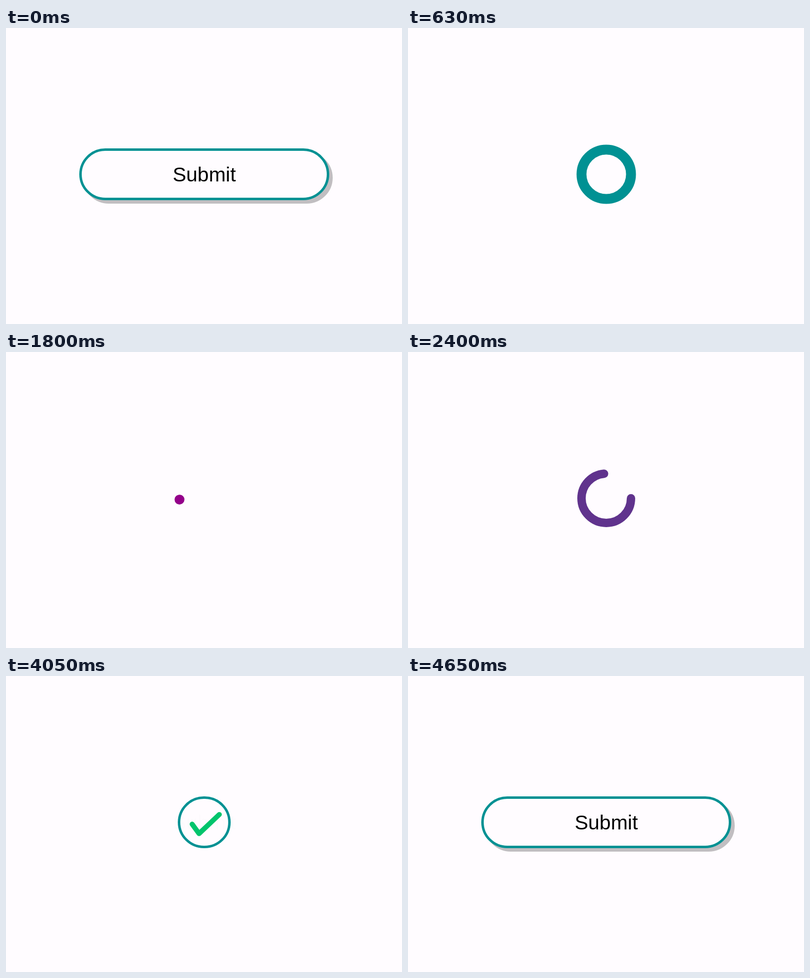
Animation of 800x600 px, one loop 6.3 s. Source, as an HTML page:

```html
<!DOCTYPE html>
<html lang="en">
<head>
<meta charset="utf-8">
<title>Submit button</title>
<style>
  html, body { margin: 0; width: 100%; height: 100%; overflow: hidden; background: #fffcff; }
  svg { display: block; width: 100%; height: 100%; }
  text { font: 41px "Liberation Sans", Arial, sans-serif; text-anchor: middle; }
</style>
</head>
<body>
<svg viewBox="0 0 800 600">
  <g id="button">
    <rect id="shadow" y="246.5" height="100" rx="50" stroke="#000"/>
    <rect id="pill" y="246.5" height="100" rx="50" fill="#fffcff" stroke="#009193"/>
  </g>
  <text id="label" x="400.5" y="310.5">Submit</text>
  <circle id="ring" cx="400.5" cy="296.5" r="50" fill="none" stroke-linecap="round" pathLength="360"/>
  <path id="check" d="M376 300.3 L390 319.5 L431 280.7" fill="none" stroke="#00c46c" stroke-width="10"
        stroke-linecap="round" stroke-linejoin="round" pathLength="100"/>
</svg>
<script>
const LOOP = 6300, STEP = 30, PHASE = 660;
const TEAL = [0, 145, 147], PURPLE = [148, 0, 138];
const THIN = 5, THICK = 20;
const COLLAPSE = 286; // angle on the ring where the arc shrinks to a dot

const $ = id => document.getElementById(id);
const set = (id, attrs) => {
  for (const key in attrs) $(id).setAttribute(key, attrs[key]);
};
const show = (id, on) => set(id, { visibility: on ? 'visible' : 'hidden' });
const mix = (a, b, k) => a + (b - a) * k;
const span = (t, from, length) => Math.min(1, Math.max(0, (t - from) / length));
const easeOut = (p, power) => 1 - (1 - p) ** power;
const easeInOut = p => p < 0.5 ? 2 * p * p : 1 - 2 * (1 - p) ** 2;
const blend = (a, b, k) => `rgb(${a.map((v, i) => Math.round(mix(v, b[i], k)))})`;

function drawButton(shrink, stroke, fade, textOpacity) {
  const box = {
    x: 150.5 + 200 * shrink,
    width: 500 - 400 * shrink,
    'stroke-width': stroke
  };
  const offset = mix(7, 14.4, fade);
  set('pill', box);
  set('shadow', { ...box, opacity: 0.24 * (1 - fade), transform: `translate(${offset} ${offset})` });
  set('label', { opacity: textOpacity });
}

function drawRing(start, end, turn, stroke, color) {
  const length = Math.max(end - start, 0.01);
  set('ring', {
    stroke: color,
    'stroke-width': stroke,
    'stroke-dasharray': length > 359.9 ? 'none' : `${length} ${360 - length}`,
    'stroke-dashoffset': -start,
    transform: `rotate(${turn} 400.5 298.5)`
  });
}

function drawCheck(amount, opacity) {
  show('check', amount > 0 && opacity > 0);
  set('check', {
    opacity,
    'stroke-dasharray': amount > 0.999 ? 'none' : `${100 * amount} 200`
  });
}

function render(t) {
  const inRing = t >= PHASE && t < 4020;
  show('button', !inRing);
  show('label', !inRing);
  show('ring', inRing);
  drawCheck(0, 0);

  if (t < PHASE) {
    const p = t / PHASE;
    drawButton(easeInOut(span(t, 140, 265)), mix(THIN, THICK, span(t, 0, 590)),
      easeOut(p, 4), 1 - easeOut(p, 3));
  } else if (t < 2 * PHASE) {
    const k = easeOut(span(t, PHASE, PHASE), 4);
    drawRing(COLLAPSE * k, mix(360, COLLAPSE, k), 180 * k, THICK,
      blend(TEAL, PURPLE, span(t, PHASE, 510)));
  } else if (t < 3 * PHASE) {
    const at = COLLAPSE * (1 - easeOut(span(t, 2 * PHASE, PHASE), 4));
    drawRing(at, at, 180, THICK, blend(PURPLE, TEAL, 0));
  } else if (inRing) {
    const stroke = mix(THICK, THIN, easeInOut(span(t, 3 * PHASE, 2 * PHASE)));
    drawRing(0, 360 * easeInOut(span(t, 3 * PHASE, PHASE)), 0, stroke,
      blend(PURPLE, TEAL, span(t, 3 * PHASE, 1200)));
    drawCheck(easeOut(span(t, 4 * PHASE, PHASE), 4), 1);
  } else {
    const k = easeInOut(span(t, 4020, 630));
    drawButton(1 - k, THIN, 1 - k, k);
    drawCheck(1, 1 - k);
  }
}

const begin = performance.now();
function tick() {
  const t = (performance.now() - begin) % LOOP;
  render(Math.floor(t / STEP) * STEP);
  requestAnimationFrame(tick);
}
tick();
</script>
</body>
</html>
```
